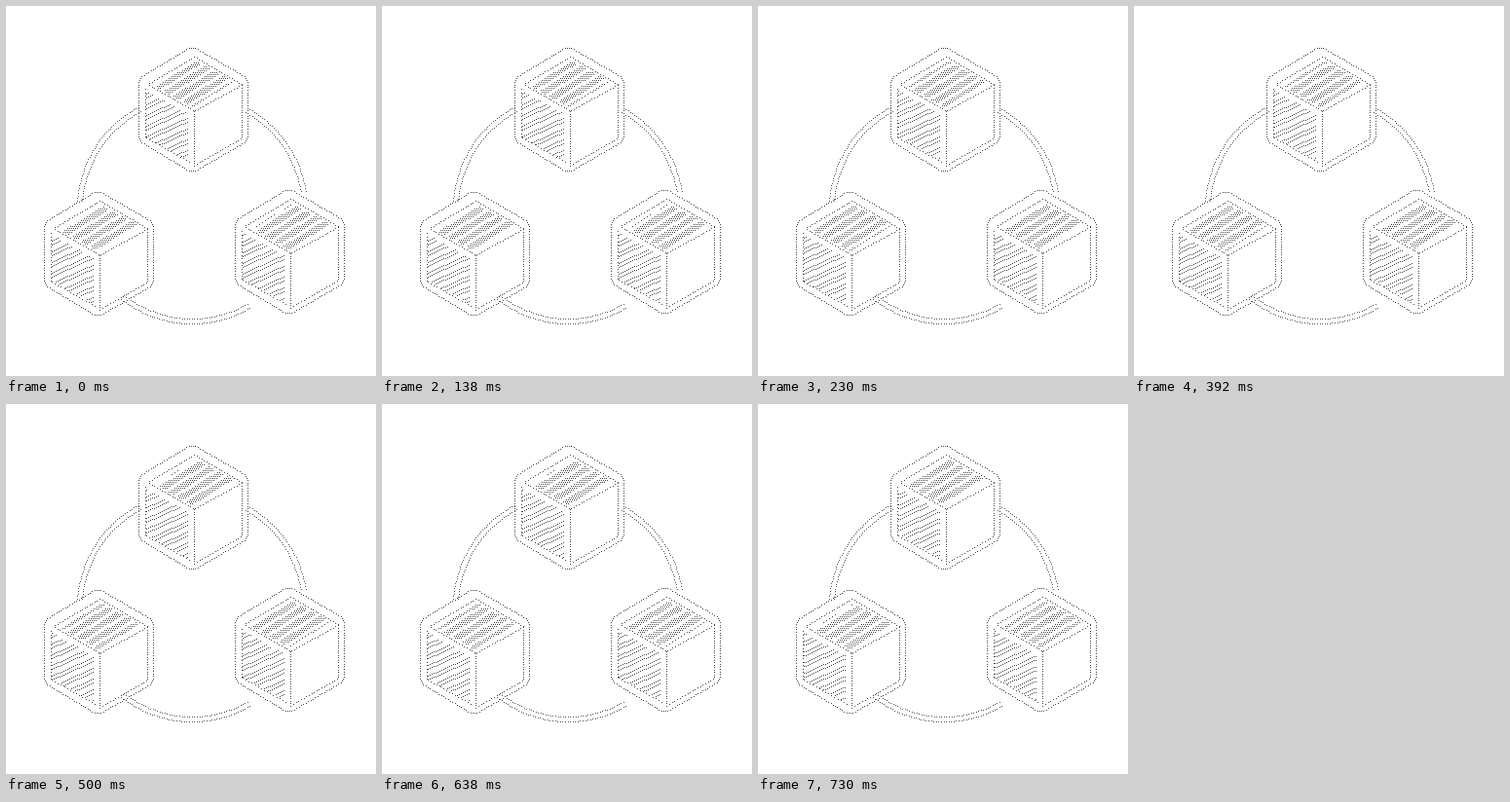
Recreate the animation shown at these times as an HTML page with a canvas. Size 380x380 px, loop 960 ms.

```html
<!DOCTYPE html>
<html lang="en">
<head>
<meta charset="utf-8">
<title>Linked blocks</title>
<style>
html, body { margin: 0; width: 100%; height: 100%; overflow: hidden; background: #fff; }
canvas { display: block; width: 380px; height: 380px; }
</style>
</head>
<body>
<canvas id="stage" width="380" height="380"></canvas>
<script>
const ctx = document.getElementById('stage').getContext('2d');
const LOOP = 960;
const STEPS = [230, 500, 730];
const PERIOD = 11;
const CUBES = [[0, 0, 0], [-97, 148, 3], [99, 146, 6]];
const HULL = [[191, 41], [248, 74], [248, 138], [191, 171], [136, 138], [136, 74]];
const mod = (a, n) => ((a % n) + n) % n;

function dot(x, y) {
  ctx.fillRect(Math.round(x), Math.round(y), 1, 1);
}

function line(x1, y1, x2, y2, gap) {
  const n = Math.max(1, Math.round(Math.hypot(x2 - x1, y2 - y1) / gap));
  for (let i = 0; i <= n; i++) {
    dot(x1 + (x2 - x1) * i / n, y1 + (y2 - y1) * i / n);
  }
}

// Closed outline with cut corners
function outline(points, gap, cut) {
  const ends = points.map((p, i) => {
    const q = points[(i + 1) % points.length];
    const k = cut / Math.hypot(q[0] - p[0], q[1] - p[1]);
    const dx = (q[0] - p[0]) * k, dy = (q[1] - p[1]) * k;
    return [p[0] + dx, p[1] + dy, q[0] - dx, q[1] - dy];
  });
  ends.forEach((e, i) => {
    const next = ends[(i + 1) % ends.length];
    line(...e, gap);
    line(e[2], e[3], next[0], next[1], gap);
  });
}

function arc(r, from, to, gap) {
  const n = Math.round(r * (to - from) * Math.PI / 180 / gap);
  for (let i = 0; i <= n; i++) {
    const a = (from + (to - from) * i / n) * Math.PI / 180;
    dot(191 + r * Math.cos(a), 208 + r * Math.sin(a));
  }
}

function ring() {
  for (const r of [113, 118]) {
    arc(r, 184, 242, 2.6);
    arc(r, 299, 351, 2.6);
    arc(r, 60, 128, 2.6);
  }
}

function hatchTop(shift) {
  for (let y = 54; y < 106; y++) {
    for (let x = 152; x < 239; x++) {
      const w = y + 0.62 * x;
      const u = y - 0.54 * x;
      if (w < 177 || w > 222 || u < -49 || u > 0) continue;
      const m = mod(w - shift, PERIOD);
      if (m < 7 && y % 2 === 0 && (x + y / 2) % 2 === 0) dot(x, y);
    }
  }
}

function hatchSide(shift) {
  for (let x = 144; x < 188; x++) {
    const top = 86 + (x - 143) * 0.55;
    for (let y = Math.ceil(top); y < top + 48; y++) {
      const m = mod(y + 0.45 * x - shift, PERIOD);
      if ((m < 1 || (m >= 4 && m < 5)) && x % 2 === 0) dot(x, y);
    }
  }
}

function cube(dx, dy, offset, pose) {
  const shift = offset - pose * PERIOD / 4;
  ctx.save();
  ctx.translate(dx, dy);
  ctx.fillStyle = '#444';
  outline(HULL, 2.7, 4);
  line(193, 52, 242, 80, 3);
  line(193, 52, 147, 79, 3);
  line(147, 81, 192, 107, 3);
  line(194, 107, 242, 81, 3);
  line(193, 108, 193, 164, 2.5);
  line(242, 84, 242, 134, 2.5);
  line(196, 162, 241, 136, 3);
  line(143, 85, 143, 134, 3.5);
  line(144, 135, 188, 160, 3.5);
  hatchTop(shift);
  hatchSide(shift);
  ctx.restore();
}

function draw(pose) {
  ctx.fillStyle = '#fff';
  ctx.fillRect(0, 0, 380, 380);
  ctx.fillStyle = '#555';
  ring();
  for (const c of CUBES) cube(...c, pose);
}

let shown = -1;
function tick(now) {
  const t = now % LOOP;
  const pose = STEPS.filter(s => t >= s).length;
  if (pose !== shown) draw(shown = pose);
  requestAnimationFrame(tick);
}
tick(0);
</script>
</body>
</html>
```
